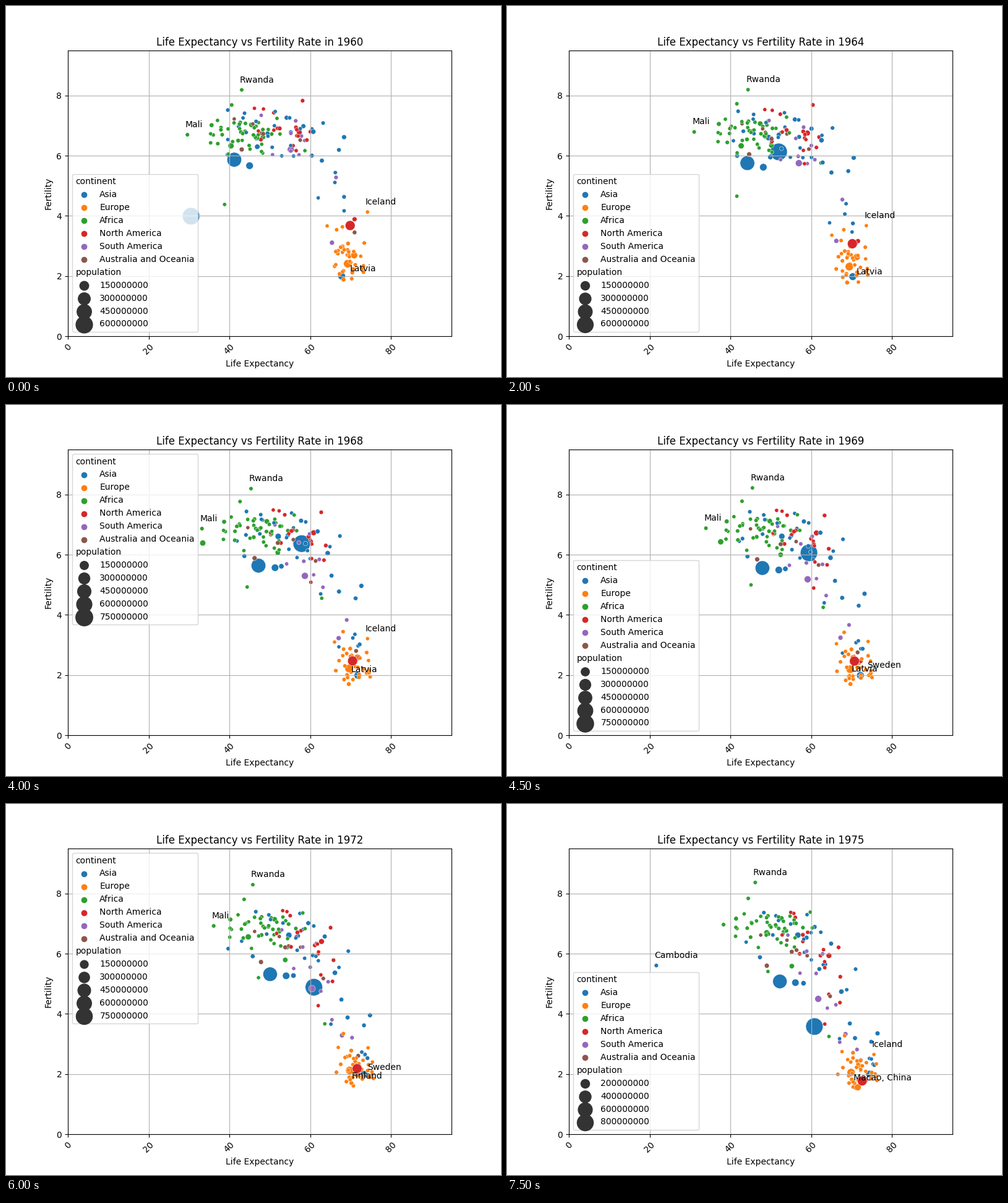
A matplotlib script that plays this animation: 800x600 px, repeating every 8000 ms.

```python
import numpy as np
import matplotlib.pyplot as plt
from matplotlib.animation import FuncAnimation
from matplotlib.offsetbox import DrawingArea, HPacker

FIRST, COUNT = 1960, 16
YEARS = np.arange(COUNT)
COLORS = {"Asia": "tab:blue", "Europe": "tab:orange", "Africa": "tab:green",
          "North America": "tab:red", "South America": "tab:purple",
          "Australia and Oceania": "tab:brown"}
HEADS = ("continent", "population")
UPPER_LEGEND = {7, 8, 10, 11, 12, 13, 14}

rng = np.random.default_rng(12)
named, small = {}, []


def country(name, region, pop, **keys):
    """Straight legs between a few key years, y60=(life, fertility)."""
    years = [int(k[1:]) - 60 for k in keys]
    life, fert = zip(*keys.values())
    track = np.column_stack([np.interp(YEARS, years, life),
                             np.interp(YEARS, years, fert)])
    named[name] = (track, region, pop)


def crowd(region, n, life, spread, gain, high, low, mid, slope):
    """Small countries: fertility falls as life expectancy passes `mid`."""
    for _ in range(n):
        start = life + spread * np.clip(rng.normal(), -1.8, 1.8)
        x = start + rng.normal(gain, 1.2) * YEARS / (COUNT - 1)
        drop = 1 / (1 + np.exp((mid + rng.normal(0, 2.5) - x) / 2.5))
        noise = np.clip(rng.normal(0, 0.45), -1, 1) * (1 - 0.4 * drop)
        y = high + (low - high) * drop + noise + slope * YEARS
        small.append((np.column_stack([x, y.clip(1.7, 8.1)]), region,
                      rng.exponential(5)))


country("China", "Asia", 645, y60=(30.5, 3.99), y61=(31.7, 3.29),
        y62=(44.1, 5.98), y63=(50.1, 7.5), y64=(51.95, 6.13),
        y66=(55.35, 6.21), y67=(56.7, 5.26), y68=(57.9, 6.37),
        y70=(61, 5.76), y75=(60.8, 3.58))
country("India", "Asia", 450, y60=(41.2, 5.87), y68=(47.2, 5.64),
        y75=(52.25, 5.08))
country("Indonesia", "Asia", 88, y60=(45, 5.67), y68=(51.3, 5.57),
        y75=(56.1, 5.04))
country("Bangladesh", "Asia", 50, y60=(46.8, 6.6), y75=(56.7, 6.62))
country("Turkey", "Asia", 28, y60=(46.9, 6.3), y75=(58.1, 5.02))
country("Cambodia", "Asia", 6, y60=(42.3, 6.97), y68=(44.1, 6.66),
        y72=(39.7, 6.17), y74=(36.3, 5.8), y75=(21.65, 5.61))
country("Macao, China", "Asia", 0.2, y60=(62, 4.6), y73=(70.3, 1.9),
        y74=(70.6, 1.5), y75=(71, 1.53))
country("Japan", "Asia", 93, y60=(67.8, 2), y64=(70.3, 1.98), y75=(74.45, 2))

country("Nigeria", "Africa", 45, y60=(40.4, 6.33), y66=(43.8, 6.33),
        y68=(33.4, 6.39), y70=(41.8, 6.47), y75=(49, 6.7))
country("Egypt", "Africa", 27, y60=(48.3, 6.62), y75=(55.2, 5.59))
country("Rwanda", "Africa", 3, y60=(43.05, 8.19), y65=(44.7, 8.2),
        y68=(45.35, 8.2), y75=(46.15, 8.37))
country("Mali", "Africa", 5, y60=(29.6, 6.7), y66=(31.75, 6.84),
        y75=(38.3, 6.97))
country("Gabon", "Africa", 1, y60=(38.8, 4.38), y75=(49.3, 5.41))
country("Mauritius", "Africa", 1, y60=(58.7, 6.17), y64=(62.4, 5.76),
        y70=(63.1, 3.95), y75=(64.4, 3.25))

country("Iceland", "Europe", 0.2, y60=(74.2, 4.13), y66=(73.4, 3.45),
        y68=(74.2, 3.21), y70=(74, 3.02), y73=(74.5, 2.8), y75=(75.55, 2.65))
country("Norway", "Europe", 4, y60=(73.4, 3.1), y64=(73.4, 2.96),
        y66=(74.15, 2.88), y68=(74, 2.75), y75=(74.8, 1.98))
country("Sweden", "Europe", 8, y60=(73.1, 2.2), y68=(74, 2.07),
        y70=(74.65, 1.92), y75=(74.85, 1.85))
country("Latvia", "Europe", 2, y60=(70.3, 1.91), y64=(71.7, 1.8),
        y68=(70.6, 1.85), y75=(69.3, 1.94))
country("Finland", "Europe", 4, y60=(69.2, 2.7), y68=(70.1, 2.1),
        y70=(70.5, 1.83), y73=(70.8, 1.5), y75=(70.4, 1.57))
country("Russia", "Europe", 120, y60=(69.3, 2.41), y75=(69.9, 2.05))
country("Germany", "Europe", 73, y60=(70.9, 2.69), y68=(71.7, 2.58),
        y75=(71.55, 1.56))

country("Brazil", "South America", 73, y60=(55.2, 6.21), y75=(61.75, 4.5))
country("Argentina", "South America", 20, y60=(65.4, 3.11), y75=(68.5, 3.33))
country("Australia", "Australia and Oceania", 10, y60=(71, 3.45),
        y66=(71.1, 2.9), y75=(72.3, 2.46))
country("Mexico", "North America", 38, y60=(57.3, 6.78), y70=(61.75, 6.72),
        y75=(64.4, 5.94))
country("Canada", "North America", 18, y60=(71, 3.89), y66=(71.9, 2.8),
        y75=(72.9, 1.8))
country("USA", "North America", 187, y60=(69.9, 3.68), y68=(70.5, 2.47),
        y70=(70.95, 2.46), y75=(72.65, 1.77))

crowd("Africa", 42, 44, 4.8, 6.7, 6.75, 5, 70, 0.01)
crowd("Asia", 31, 54, 8, 7.5, 7, 2.4, 69, -0.01)
crowd("Europe", 32, 68.7, 2.5, 2.5, 6.2, 2.4, 61.5, -0.02)
crowd("North America", 17, 57, 6, 7, 6.9, 2.4, 65, -0.01)
crowd("South America", 9, 56, 6, 6, 6.6, 2.4, 68, -0.04)
crowd("Australia and Oceania", 7, 52, 6, 7, 6.9, 3, 66, -0.04)

rng.shuffle(small)
names, big = list(named), list(named.values())
rows = big[:-1] + small + big[-1:]
tracks = np.array([r[0] for r in rows])
colors = [COLORS[r[1]] for r in rows]
pops = np.array([r[2] for r in rows])
labelled = np.array([r[0] for r in big])

fig, ax = plt.subplots(figsize=(8, 6), dpi=100)


def dot_size(pop, top):
    return 20 + 380 * pop / top


def draw_legend(t, top):
    def entry(label, **style):
        return ax.scatter([], [], label=label, **style)

    step = 150 if top < 900 else 200
    items = [entry(HEADS[0])]
    items += [entry(k, color=c) for k, c in COLORS.items()]
    items.append(entry(HEADS[1]))
    items += [entry(f"{p}000000", color="0.2", s=dot_size(p, top))
              for p in range(step, int(top), step)]
    loc = "upper left" if t in UPPER_LEGEND else "lower left"
    legend = ax.legend(handles=items, loc=loc)

    # Headings lose their marker and move left
    for row in legend.findobj(HPacker):
        kids = row.get_children()
        if isinstance(kids[0], DrawingArea) and kids[1].get_text() in HEADS:
            kids[0].set_width(0)
            kids[0].set_visible(False)


def draw(t):
    ax.clear()
    now = pops * 1.02 ** t
    now[0] = top = np.interp(t, (0, 7, 14, 15), (645, 745, 896, 915))
    ax.scatter(*tracks[:, t].T, s=dot_size(now, top), c=colors,
               edgecolors="w", linewidths=0.36)

    life, fert = labelled[:, t].T
    for i in (life.argmin(), life.argmax(), fert.argmin(), fert.argmax()):
        ax.text(life[i] - 0.5, fert[i] + 0.25, names[i])

    ax.set(xlim=(0, 95), ylim=(0, 9.5), xlabel="Life Expectancy",
           ylabel="Fertility",
           title=f"Life Expectancy vs Fertility Rate in {FIRST + t}")
    ax.set_xticks(range(0, 81, 20))
    ax.set_yticks(range(0, 9, 2))
    ax.tick_params(axis="x", rotation=45)
    ax.grid(True)
    draw_legend(t, top)
    return []


anim = FuncAnimation(fig, draw, frames=COUNT, interval=500, repeat=True,
                     repeat_delay=0)
plt.show()
```
